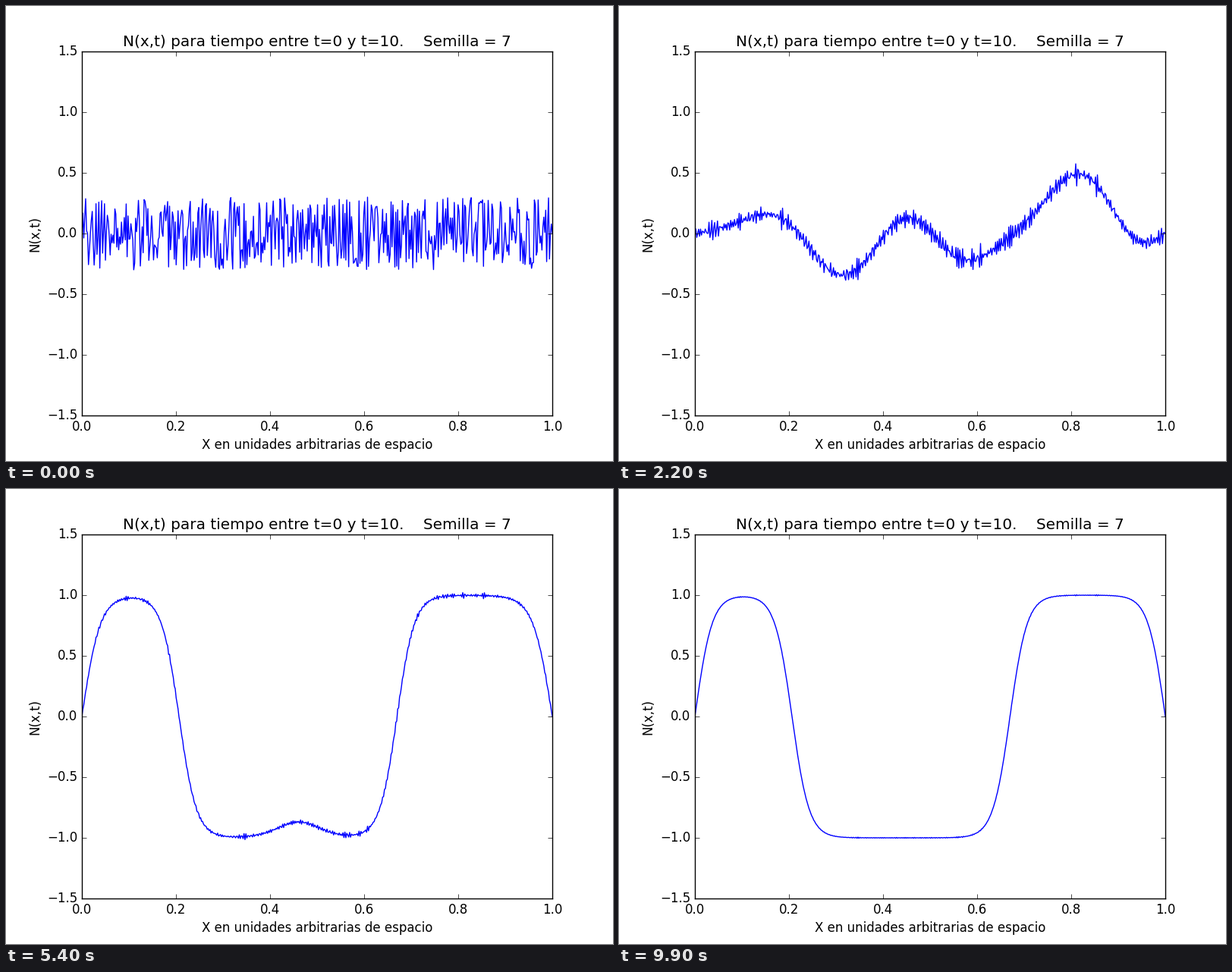
Write a matplotlib script that moves like this. It is 800x600 px and loops after 10 s.

```python
import numpy as np
import matplotlib.pyplot as plt
from matplotlib.animation import FuncAnimation

SEED = 7
POINTS = 500
STEPS = 100
DT = 0.1
GAMMA = 0.001
MU = 1.5


def solve():
    """Newell-Whitehead-Segel: Crank-Nicolson diffusion, Euler reaction."""
    np.random.seed(SEED)
    n = np.random.uniform(-0.3, 0.3, POINTS)
    n[0] = n[-1] = 0

    r = GAMMA * DT * (POINTS - 1) ** 2 / 2
    lap = (np.eye(POINTS, k=1) + np.eye(POINTS, k=-1) - 2 * np.eye(POINTS)) * r
    lap[[0, -1]] = 0
    implicit = np.linalg.inv(np.eye(POINTS) - lap)
    explicit = np.eye(POINTS) + lap

    states = [n]
    for _ in range(STEPS - 1):
        n = implicit @ (explicit @ n + DT * MU * (n - n ** 3))
        n[0] = n[-1] = 0
        states.append(n)
    return states


plt.style.use("classic")
plt.rcParams["font.family"] = "DejaVu Sans"

fig = plt.figure(figsize=(8, 6), dpi=100, facecolor="white")
ax = fig.add_axes([0.125, 0.1, 0.775, 0.8])
ax.set_xlim(0, 1)
ax.set_ylim(-1.5, 1.5)
ax.set_title(f"N(x,t) para tiempo entre t=0 y t=10.    Semilla = {SEED}")
ax.set_xlabel("X en unidades arbitrarias de espacio")
ax.set_ylabel("N(x,t)")

states = solve()
line, = ax.plot(np.linspace(0, 1, POINTS), states[0], "b-")


def update(i):
    line.set_ydata(states[i])
    return line,


anim = FuncAnimation(fig, update, frames=STEPS, interval=100,
                     repeat=True, repeat_delay=0)
plt.show()
```
